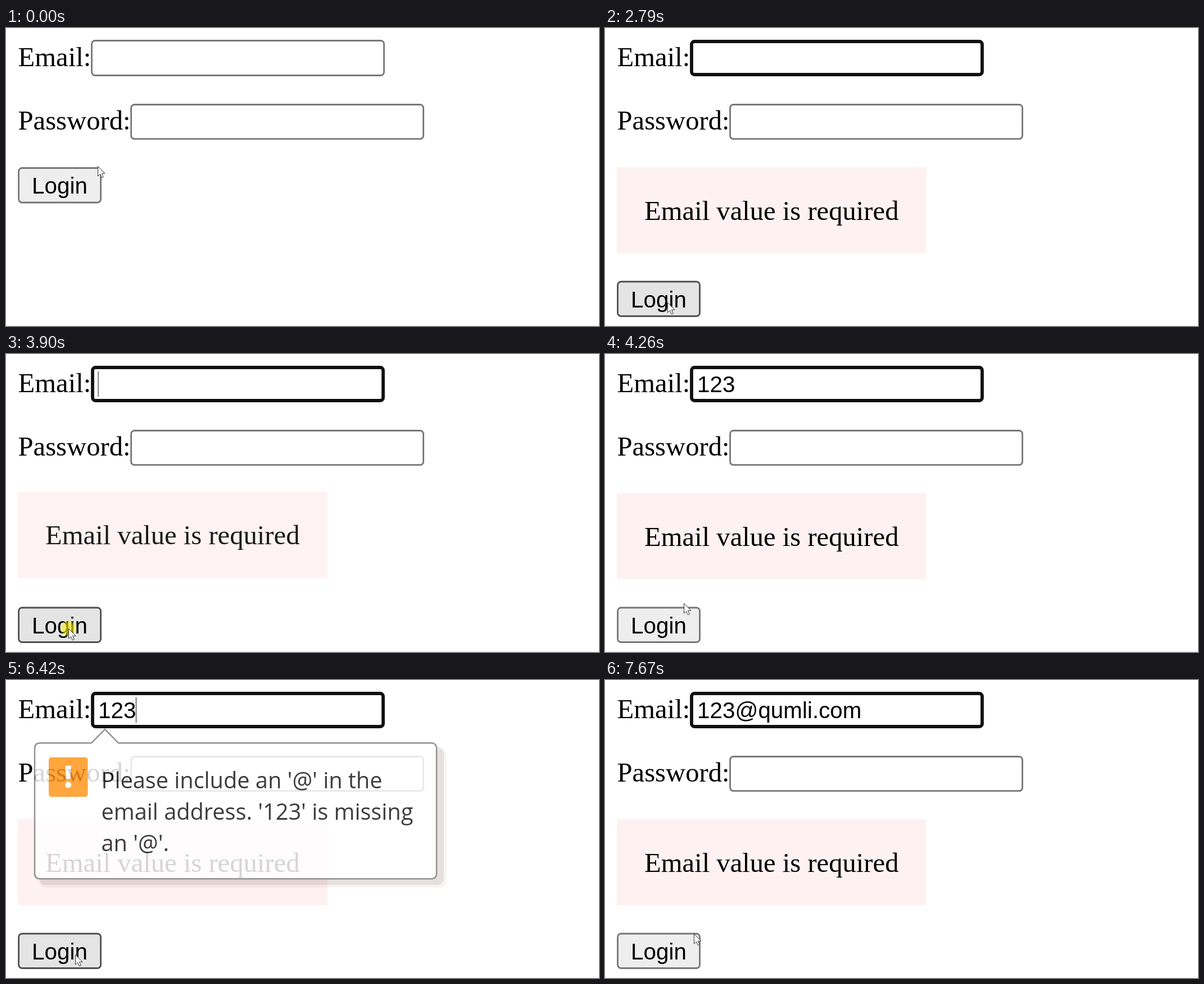
Write an HTML page that moves like this. It is 1055 px wide and 531 px high and loops after 8000 ms.

```html
<!DOCTYPE html>
<html lang="en">
<head>
<meta charset="utf-8">
<title>Login form</title>
<style>
  html, body { margin: 0; width: 100%; height: 100%; overflow: hidden; background: #fff; }
  svg { display: block; width: 100%; height: 100%; }
  .serif { font: 48.65px "Liberation Serif", "Times New Roman", serif; }
  .sans { font: 40.4px "Liberation Sans", Arial, sans-serif; }
  .tip { font: 39.7px "Open Sans", "Noto Sans", sans-serif; fill: #161616; }
</style>
</head>
<body>
<svg viewBox="0 0 1055 531">
  <defs>
    <radialGradient id="glow">
      <stop offset=".55" stop-color="#fff200" stop-opacity=".62"/>
      <stop offset="1" stop-color="#fff200" stop-opacity="0"/>
    </radialGradient>
  </defs>
  <rect width="1055" height="531" fill="#fff"/>
  <rect y="530" width="1055" height="1" fill="#eee"/>

  <text class="serif" x="21.5" y="68">Email:</text>
  <rect id="field" fill="#fff"/>
  <text id="value" class="sans" x="164" y="68"></text>
  <rect id="caret" y="31" width="1.2" height="45" fill="#333"/>

  <text class="serif" x="21.5" y="181">Password:</text>
  <rect x="222.6" y="136.5" width="520" height="61.200" rx="6" fill="#fff" stroke="#767676" stroke-width="2.800"/>

  <g id="error">
    <rect x="21" y="248" width="550.5" height="153.5" fill="#fef1f1"/>
    <text class="serif" x="70" y="341.5">Email value is required</text>
  </g>

  <g id="button">
    <rect id="face" x="22.6" y="249.5" width="146" height="61.5" rx="6" stroke-width="2.800"/>
    <text class="sans" x="95.5" y="295" text-anchor="middle">Login</text>
  </g>

  <g id="bubble">
    <rect x="60" y="122" width="724" height="248" rx="13" fill="#601010" fill-opacity=".05"/>
    <rect x="58" y="119" width="721" height="246" rx="12" fill="#402828" fill-opacity=".12"/>
    <path d="M61 112H152L176 87.500L200 112H756Q766 112 766 122V344Q766 354 756 354H61Q51 354 51 344V122Q51 112 61 112Z"
          fill="#fff" stroke="#7c7c7c" stroke-width="2.500"/>
    <rect x="76" y="137.500" width="69.500" height="70.500" rx="5" fill="#ff951a"/>
    <path d="M105.500 152.500H116L114.500 176H107Z" fill="#fff"/>
    <circle cx="110.700" cy="186.500" r="5.500" fill="#fff"/>
    <text class="tip" x="169.500" y="193">Please include an '@' in the</text>
    <text class="tip" x="169.500" y="249">email address. '123' is missing</text>
    <text class="tip" x="169.500" y="305">an '@'.</text>
  </g>

  <circle id="press" r="13" fill="#808000" style="mix-blend-mode:lighten"/>
  <circle id="click" r="16" fill="url(#glow)"/>
  <path id="cursor" d="M.500 .500V18L4.600 14.300L7.400 20.800L10.200 19.600L7.500 13.200H13Z"
        fill="#fff" stroke="#333" stroke-width="1" stroke-linejoin="round"/>
</svg>
<script>
const LOOP = 8000;
const PRESSES = [[910, 990], [2960, 3080], [3370, 3450], [3690, 3770], [6040, 6210]];
const HOVERS = [[580, 990], [2790, 4110], [5870, 6700]];
const CARETS = [[3450, 3690], [3770, 4260], [6210, 7670]];
const ERRORS = [990, 3080, 3450, 3770];
const ADDRESS = "123@qumli.com";

// Pointer keys: time, x, y; repeated times are jumps.
const PATH = [
  [0, 163, 246], [580, 163, 246], [580, 133, 284], [1060, 133, 284],
  [1240, 133, 440], [2790, 133, 440], [2790, 111, 489], [4050, 111, 489],
  [4240, 140, 444], [5870, 140, 444], [5870, 124, 487], [6210, 124, 487],
  [6380, 123, 489], [6620, 123, 489], [6760, 158, 452], [LOOP, 158, 452]
];

const $ = id => document.getElementById(id);
const clamp = v => Math.max(0, Math.min(1, v));
const easeOut = v => 1 - (1 - clamp(v)) ** 3;
const within = (t, ranges) => ranges.some(([a, b]) => t >= a && t < b);
const show = (id, on) => $(id).setAttribute("opacity", on ? 1 : 0);
const move = (id, x, y) => $(id).setAttribute("transform", `translate(${x} ${y})`);

function set(id, attrs) {
  for (const key in attrs) $(id).setAttribute(key, attrs[key]);
}

function pointer(t) {
  let i = 0;
  while (i < PATH.length - 2 && t >= PATH[i + 1][0]) i++;
  const [t0, x0, y0] = PATH[i], [t1, x1, y1] = PATH[i + 1];
  const k = clamp((t - t0) / (t1 - t0));
  return [x0 + (x1 - x0) * k, y0 + (y1 - y0) * k];
}

function typed(t) {
  const first = t < 4060 ? 0 : Math.min(3, 1 + Math.floor((t - 4060) / 60));
  const rest = t < 6800 ? 0 : 1 + Math.floor((t - 6800) / 40);
  return ADDRESS.slice(0, first + rest);
}

function drawField(t, focused) {
  const line = focused ? 5.8 : 2.8;
  const inset = line / 2 + 0.1;
  set("field", {
    x: 151 + inset, y: 21 + inset, width: 523 - 2 * inset, height: 65 - 2 * inset,
    rx: focused ? 5 : 6, stroke: focused ? "#101010" : "#767676", "stroke-width": line
  });
  $("value").textContent = typed(t);
  const width = $("value").textContent ? $("value").getComputedTextLength() : 0;
  $("caret").setAttribute("x", 163.5 + width);
  show("caret", focused && within(t, CARETS));
}

function drawButton(t, down, failed) {
  const [fill, stroke] = down ? ["#fef1f1", "#8d8d8d"]
    : within(t, HOVERS) ? ["#e4e4e4", "#4f4f4f"] : ["#eee", "#767676"];
  set("face", { fill, stroke });
  move("button", 0, failed ? 202.5 : 0);
}

function drawError(t) {
  const start = ERRORS.filter(s => s <= t).pop();
  const k = start === undefined ? 0 : easeOut((t - start) / 250);
  $("error").setAttribute("opacity", k);
  move("error", 0, -20 * (1 - k));
}

function drawBubble(t) {
  const shown = easeOut((t - 6210) / 466);
  const gone = clamp((t - 6900) / 270);
  $("bubble").setAttribute("opacity", shown * (1 - gone));
  move("bubble", 0, 68 * ((1 - shown) ** 3 + gone ** 2));
}

function drawPointer(t, down) {
  const [x, y] = pointer(t);
  move("cursor", x, y);
  move("press", x, y);
  move("click", x, y);
  show("cursor", t < 6800 || t >= 7670);
  show("press", down);
  const since = Math.min(...PRESSES.map(([, up]) => t >= up ? t - up : Infinity));
  $("click").setAttribute("opacity", down ? 0 : clamp((200 - since) / 70));
}

function draw(t) {
  const down = within(t, PRESSES);
  const failed = t >= ERRORS[0];
  drawField(t, failed && !down);
  drawButton(t, down, failed);
  drawError(t);
  drawBubble(t);
  drawPointer(t, down);
}

const begin = performance.now();
function tick() {
  draw((performance.now() - begin) % LOOP);
  requestAnimationFrame(tick);
}
tick();
</script>
</body>
</html>
```
